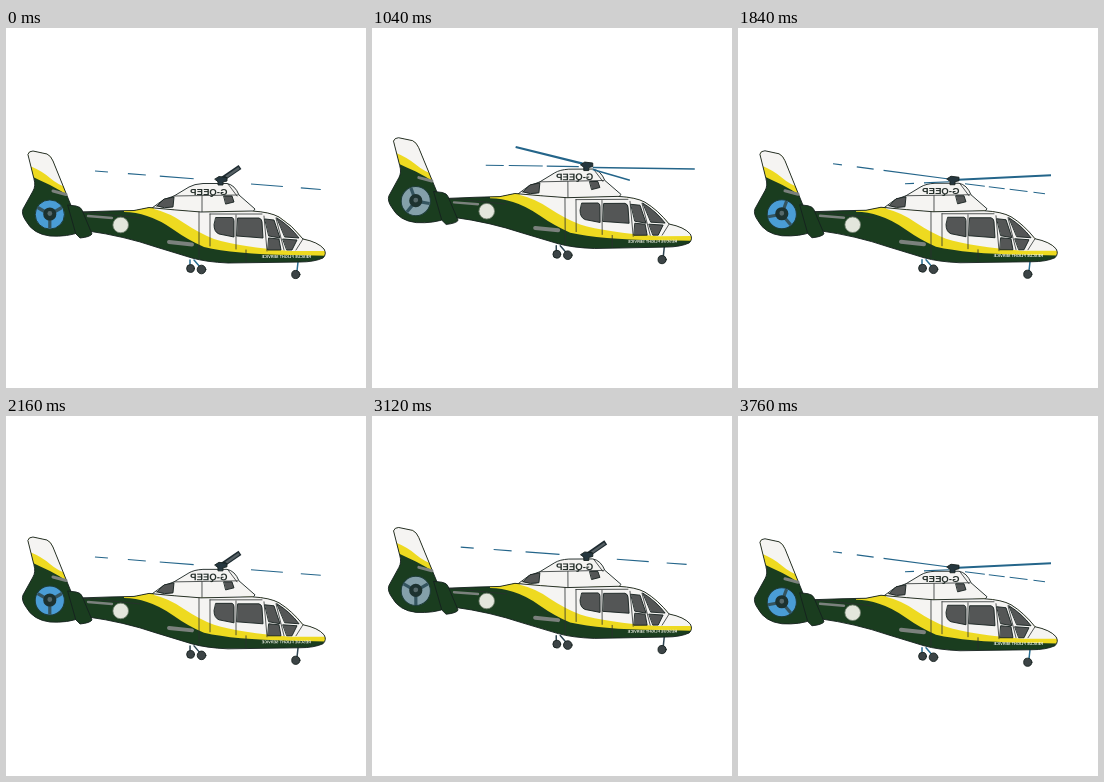
Animation, 360 px wide and 360 px high, one loop 3840 ms. Source, as an HTML page:

```html
<!DOCTYPE html>
<html lang="en">
<head>
<meta charset="utf-8">
<title>Helicopter</title>
<style>
html, body { margin: 0; width: 100%; height: 100%; overflow: hidden; background: #fff; }
svg { display: block; width: 100vw; height: 100vh; }
text { font-family: "Liberation Sans", Arial, sans-serif; font-weight: bold; }
.ink { stroke: #16211f; stroke-width: .9; stroke-linejoin: round; stroke-linecap: round; }
.line { fill: none; stroke: #2a2f2f; stroke-width: .8; stroke-linecap: round; }
.glass { fill: #545656; }
.green { fill: #1a3d1f; }
.yellow { fill: #eeda20; }
.white { fill: #f5f4f2; }
.slot { fill: none; stroke: #7b817d; stroke-linecap: round; }
</style>
</head>
<body>
<svg viewBox="0 0 360 360">
  <defs>
    <clipPath id="hull"><path id="hullShape" d="M74 184 L104 183 L128 182.500 L143 179.500 Q168 182 195 184 L246 183 Q264 184 273 189 Q286 197 297 211 Q312 214 318 221 Q321 226 317 230 Q308 234 294 234 L222 235 Q200 234 186 230 L150 219 Q118 208 82 203 Z"/></clipPath>
    <clipPath id="fin"><path id="finShape" d="M22 126 Q23 123 27 123 L41 126 Q45 128 47 133 L66 180 L74 204 Q62 209 44 208 Q27 206 20 193 Q15 186 17 181 L27 163 Q30 158 28 151 Z"/></clipPath>
  </defs>
  <g id="craft">
    <g id="gear" class="ink">
      <path class="strut" d="M184 232 V238 M188 232 L194 239 M292 234 L291 243" fill="none" stroke-width="1.5"/>
      <g fill="#3c4446"><circle cx="184.500" cy="240.500" r="3.900"/><circle cx="195.500" cy="241.500" r="4.300"/><circle cx="289.800" cy="246.500" r="4.100"/></g>
    </g>

    <g clip-path="url(#fin)">
      <path class="green" d="M0 110 H90 V215 H0 Z"/>
      <path class="yellow" d="M18 110 H80 V176 L64 169 Q54 162 44 157 Q33 152 25 148 Z"/>
      <path class="white" d="M18 110 H80 V168 L64 161 Q52 157 44 150 Q36 143 24 138 Z"/>
    </g>
    <use href="#finShape" class="ink" fill="none"/>
    <path class="slot" d="M47 163 L60 166.500" stroke-width="3"/>

    <circle id="fan" cx="43.800" cy="186.500" r="14.600" stroke="#1d3b38" stroke-width="1"/>
    <g id="spokes" stroke="#34545f" stroke-width="3.200"></g>
    <circle cx="43.800" cy="186" r="6.600" fill="#1d3230"/>
    <circle cx="43.800" cy="185.500" r="2.400" fill="#56686a"/>

    <path class="ink white" d="M146 180 L157 172 L168 168 L183 159 Q188 156 197 155.500 L221 155.500 Q229 157 233 167 L249 181 L246 185 H195 Z"/>
    <path class="line" d="M168 168 L232 167 M196 168 V184 M222 156 L231 168"/>
    <path class="ink glass" d="M151 178 L158 171 L168 169 L167 179 Q158 181 151 178 Z M218 168 H226 L228 174 L220 176 Z"/>

    <g clip-path="url(#hull)">
      <path class="green" d="M70 170 H330 V240 H70 Z"/>
      <path class="yellow" d="M118 176 H330 V228 L285 227 Q228 226 198 219 Q182 212 168 202 Q154 192 141 188 Q130 184 118 184 Z"/>
      <path class="white" d="M148 176 H330 V223 L285 223 Q234 219 208 211 Q193 205 178 195 Q164 185 148 181 Z"/>
    </g>
    <use href="#hullShape" class="ink" fill="none"/>
    <path class="slot" d="M82 188 L106 190" stroke-width="2.400"/>
    <path class="slot" d="M163 214 L186 216.500" stroke-width="4"/>
    <path class="line" d="M76 184 L134 190 M193 184 V230 M204 186 V218 M204 186 H256 M230 187 V221 M258 188 L261 223 M270 190 L278 222 M297 211 L290 222 M240 222 V234"/>
    <g class="ink glass">
      <path d="M210 189.500 L226 189.500 Q228 190 228 193 V209 L213 206 Q208 204 208 197 Z"/>
      <path d="M232 190 H253 Q256 191 256 194 L257 210 L231 208 Z"/>
      <path d="M259 191 L268 192 L274 210 L263 208 Z"/>
      <path d="M271 190 Q284 198 293 210 L279 209 Z"/>
      <path d="M263 210 L273 211 L275 222 L262 222 Z M277 211 L291 212 L286 222 L281 222 Z"/>
    </g>
    <circle cx="114.700" cy="197" r="7.800" fill="#e3e6dc" stroke="#72806f" stroke-width=".8"/>
    <path class="ink green" d="M62 177 L70 178 Q75 179 76 182 L86 206 Q84 209 74 210 L70 206 Z"/>
    <text transform="translate(221.500 166.500) scale(-1 1)" font-size="9.600" fill="#26302c">G-QEEP</text>
    <text transform="translate(305 229.500) scale(-1 1)" font-size="3.900" fill="#f2f4ea">RESCUE FLIGHT SERVICE</text>

    <g id="rotor" transform="translate(215 153)" fill="none"></g>
    <path class="ink" d="M209 151 L213 148.500 L221 149.500 L221 153 L217 154 V157 H212 V154 Z" fill="#26373f"/>
  </g>
</svg>
<script>
const STEP = 80, STEPS = 48, BOB_STEPS = 24;
const $ = id => document.getElementById(id);

const blade = (x1, y1, x2, y2, width, dash = "", color = "#24658a") =>
  `<path d="M${x1} ${y1} L${x2} ${y2}" stroke="${color}" stroke-width="${width}" stroke-dasharray="${dash}"/>`;

// The rotor shows three poses in turn.
const poses = [
  blade(-126, -10, -12, -1, 1.1, "13 20 18 14 34 20") +
  blade(30, 3, 100, 8.5, 1.1, "32 18 20") +
  blade(-3, 1, 19, -14, 5, "", "#1d2a30") + blade(5, -4, 18, -13, 2.4, "", "#566064"),

  blade(-101, -2, -8, 0, 1.1, "18 5 34 4 40") +
  blade(-71, -20, -4, -3, 2.2) +
  blade(6, 1, 108, 3, 1.5) +
  blade(6, 3, 43, 14, 1.5),

  blade(-120, -17, -6, -2, 1.2, "9 15 17 10 70") +
  blade(-48, 3, -4, 1, 1.1, "9 10 40") +
  blade(5, -1, 98, -5.5, 2.2) +
  blade(12, 3, 92, 13, 1.1, "20 4 16 5 18 6 20")
].map(html => {
  const g = document.createElementNS("http://www.w3.org/2000/svg", "g");
  g.innerHTML = html;
  $("rotor").append(g);
  return g;
});

$("spokes").innerHTML = [90, 210, 330]
  .map(a => `<path d="M43.8 186.500 h14" transform="rotate(${a} 43.8 186.500)"/>`).join("");

function draw(time) {
  const step = Math.floor(time / STEP) % STEPS;
  const wave = Math.cos(2 * Math.PI * step / BOB_STEPS);
  const lift = 1 - wave;
  const high = wave < -0.6;
  $("craft").setAttribute("transform",
    `translate(0 ${-7.2 * lift}) rotate(${-0.18 * lift} 170 190)`);
  poses.forEach((g, i) => g.setAttribute("display", i === step % 3 ? "inline" : "none"));
  $("spokes").setAttribute("transform", `rotate(${step % 3 * 40} 43.8 186.5)`);
  $("fan").setAttribute("fill", high ? "#84a0aa" : "#4a9dd6");
  document.querySelector(".strut").style.stroke = wave > 0.8 ? "#286d91" : "#2c4350";
}

const start = performance.now();
function tick() {
  draw(performance.now() - start);
  requestAnimationFrame(tick);
}
tick();
</script>
</body>
</html>
```
